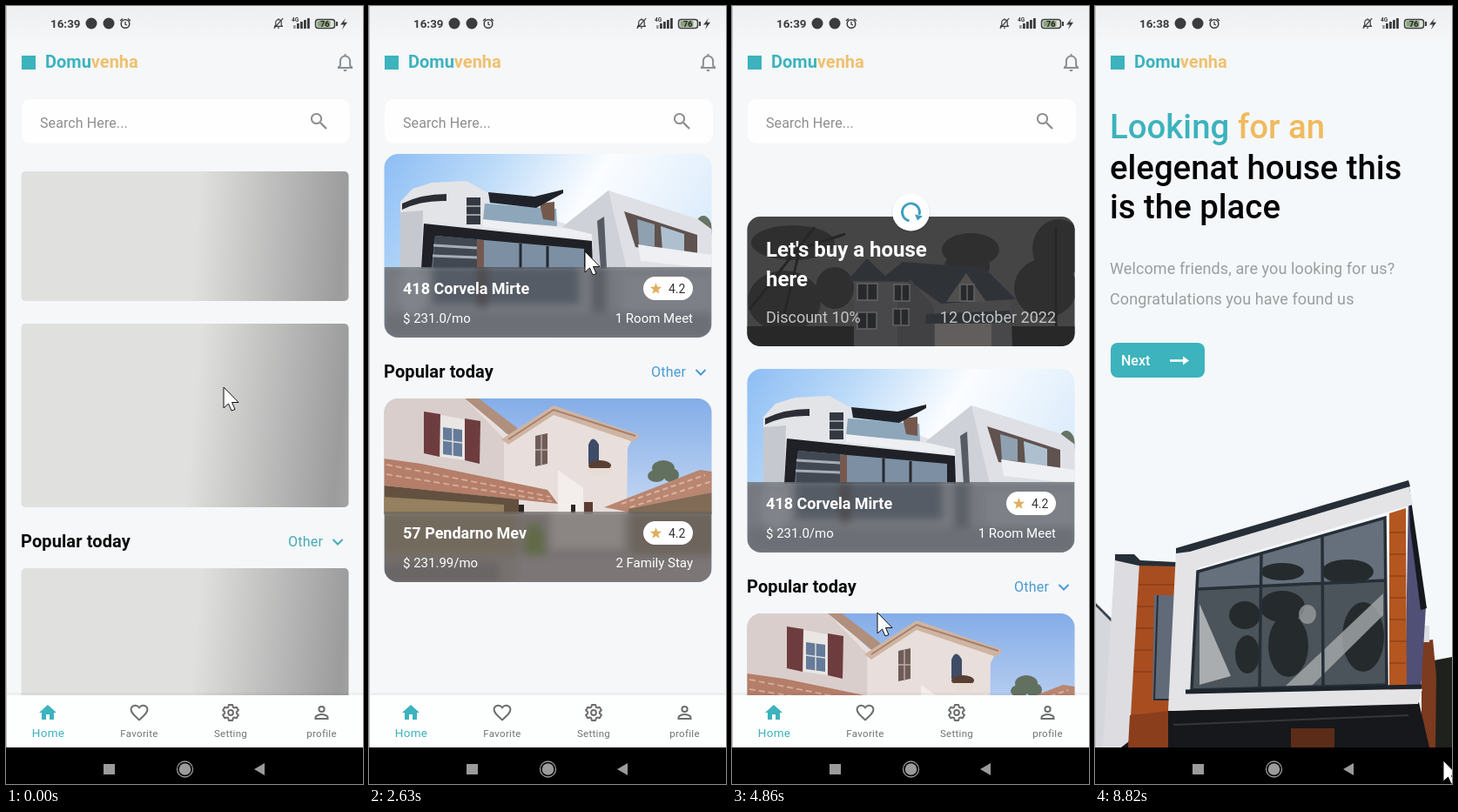
Recreate the animation shown at these times as an HTML page. Size 410 px wide and 894 px high, loop 9.02 s.

```html
<!DOCTYPE html>
<html lang="en">
<head>
<meta charset="utf-8">
<title>House rental app</title>
<style>
html, body { margin: 0; width: 100%; height: 100%; overflow: hidden; background: #f5f7f9 }
svg { display: block; width: 100vw; height: 100vh }
text { font-family: Roboto, sans-serif; white-space: pre }
</style>
</head>
<body>
<svg id="stage" viewBox="0 0 410 894"></svg>
<script>
const TEAL = '#3cb3bd', GOLD = '#efc071', LOOP = 9020;
const $ = id => document.getElementById(id);

// Drawing helpers: each returns SVG markup.
const poly = (d, fill, extra = '') => `<path d="M${d}Z" fill="${fill}" ${extra}/>`;
const line = (d, color, w = 2, extra = '') => `<path d="M${d}" fill="none" stroke="${color}" stroke-width="${w}" ${extra}/>`;
const rect = (x, y, w, h, fill, extra = '') => `<rect x="${x}" y="${y}" width="${w}" height="${h}" fill="${fill}" ${extra}/>`;
const oval = (x, y, rx, ry, fill, extra = '') => `<ellipse cx="${x}" cy="${y}" rx="${rx}" ry="${ry}" fill="${fill}" ${extra}/>`;
const text = (x, y, s, size, fill, weight = 400, extra = '') =>
  `<text x="${x}" y="${y}" font-size="${size}" fill="${fill}" font-weight="${weight}" ${extra}>${s}</text>`;
const move = (x, y, body, extra = '') => `<g transform="translate(${x} ${y})" ${extra}>${body}</g>`;
const END = 'text-anchor="end"', SOFT = 'filter="url(#soft)"';

const gear = Array.from({ length: 24 }, (_, i) => {
  const a = (Math.floor(i / 4) * 60 + [-24, -13, 13, 24][i % 4] + 30) * Math.PI / 180;
  const r = i % 4 % 3 ? 9.3 : 6.8;
  return (12 + r * Math.cos(a)).toFixed(1) + ' ' + (12 + r * Math.sin(a)).toFixed(1);
}).join(' ');
const star = Array.from({ length: 10 }, (_, i) => {
  const a = i * Math.PI / 5, r = i % 2 ? 2.9 : 7;
  return (r * Math.sin(a)).toFixed(1) + ' ' + (-r * Math.cos(a)).toFixed(1);
}).join(' ');
const bell = c => line('12 4.5a5.6 5.6 0 0 0-5.6 5.6V15.5l-2 2v.5H19.6v-.5l-2-2V10.1A5.6 5.6 0 0 0 12 4.5ZM12 2v3', c)
  + poly('10 20H14Q14 22.3 12 22.3T10 20', c);

// Status bar
const ink = '#3a3c3e';
const status = text(51, 25, '16:39', 13.4, ink, 700, 'id="clock"')
  + oval(98, 20, 6.5, 6.5, ink) + oval(118, 20, 6.5, 6.5, ink)
  + `<circle cx="137" cy="20.5" r="4.8" fill="none" stroke="${ink}" stroke-width="1.5"/>`
  + line('137 18V21L139 22M131 17L134 14.5M143 17L140 14.5', ink, 1.3)
  + move(306, 13, `<g transform="scale(.58)">${bell(ink)}${line('3 22L21 2', ink, 2)}</g>`)
  + text(328, 18, '4G', 6.5, ink, 700)
  + [0, 1, 2, 3, 4].map(i => rect(330 + i * 4, 22 - i * 2, 2.8, 4 + i * 2, i ? ink : '#999')).join('')
  + rect(355.5, 15.5, 22, 10, '#dfe6da', `rx="3" stroke="${ink}" stroke-width="1.5"`)
  + rect(357.5, 17.3, 15, 6.4, '#8aa07b', 'rx="1"') + rect(379, 18, 2, 5, ink)
  + text(361, 23.7, '76', 9, '#222', 700)
  + poly('390 14 384 21.5 388 21.5 386 27 392 18.8 388 18.8', ink);

const header = rect(18, 57, 16, 16, TEAL) + text(45, 71, `Domu<tspan fill="${GOLD}">venha</tspan>`, 20, TEAL, 700);

// Scrolling content is laid out 48px lower than its resting place.
const bannerArt = rect(17, 238, 377, 149, '#505152')
  + [[70, 268, 48, 20], [60, 335, 42, 35], [274, 276, 33, 19], [270, 295, 26, 18], [375, 275, 30, 34], [360, 320, 36, 34], [118, 320, 22, 24]]
    .map(a => oval(...a, '#343536')).join('')
  + line('20 345L95 250M60 350L78 275 130 258M372 380V250', '#29292a', 3)
  + rect(17, 364, 377, 23, '#2b2c2b')
  + poly('140 310 205 312 320 328 322 387 140 387', '#555457')
  + poly('132 312 155 286 176 306 196 290 290 297 326 333 240 338 205 313', '#353940')
  + poly('190 387 190 330 205 310 232 342 232 387', '#4c4b4e')
  + poly('246 336 269 303 292 336', '#605e5c') + poly('223 350 318 346 326 360 222 361', '#353940')
  + rect(233, 361, 65, 26, '#74716f')
  + [[144, 315, 23], [186, 316, 18], [144, 348, 22], [185, 344, 18], [262, 316, 16]]
    .map(([x, y, w]) => rect(x, y, w, 19, '#2b2d31', 'stroke="#777" stroke-width="1.5"') + line(`${x + w / 2} ${y}v19`, '#777', 1.5)).join('')
  + rect(17, 238, 377, 149, '#1c1c1e', 'opacity=".22"');
const banner = `<g clip-path="url(#c0)">${bannerArt}</g>`
  + text(39, 284, "Let's buy a house", 24, '#fff', 700) + text(39, 318, 'here', 24, '#fff', 700)
  + text(39, 360, 'Discount 10%', 18, '#c4c4c4') + text(372, 360, '12 October 2022', 18, '#c4c4c4', 400, END);

const modernArt = rect(17, 413, 377, 211, 'url(#sky1)')
  + oval(384, 500, 10, 16, '#667365')
  + poly('36 545 36 468 50 453 72 446 112 444 137 458 139 482 217 490 256 505 258 545', '#e3e4e8')
  + poly('36 480 62 478 60 545 36 545', '#c6c8cf')
  + poly('38 470Q60 459 89 459V467Q60 466 38 477', '#2b2e34')
  + rect(112, 463, 16, 31, '#343941') + line('112 473H128M112 483H128', '#b5bac2', 1.5)
  + poly('133 470 215 476 216 496 131 489', '#8da6ba') + poly('196 470 213 468 213 490 200 488', '#74584c')
  + poly('137 457 190 462 223 454 223 458 192 475 139 469', '#20222a')
  + poly('131 488 258 502 258 513 131 497', '#eeeff2')
  + poly('63 493 256 513 257 545 60 545', '#1f2127')
  + poly('76 507 247 522 247 545 72 545', '#7c8fa3')
  + poly('76 507 124 511 124 545 73 545', '#424851') + line('74 518L124 521M73 530L124 532', '#a7adb5', 3)
  + rect(124, 512, 8, 33, '#76594e') + line('174 516V545M205 519V545', '#24272d', 3)
  + poly('222 497 275 455 378 488 394 500 394 545 258 545 256 505', '#dfe0e5')
  + poly('222 497 275 455 296 545 258 545 256 505', '#cfd1d8')
  + poly('293 479 377 506 377 530 306 520', '#5f524f')
  + poly('308 488 328 494 328 519 310 518', '#8fa0b0') + poly('335 496 362 505 362 527 337 524', '#aec0d0')
  + poly('309 517 394 529 394 545 312 536', '#eef0f3')
  + poly('262 490 270 485 273 545 266 545', '#575b63');
const modernHaze = rect(10, 540, 390, 90, '#85888e') + rect(72, 540, 170, 46, '#575f69')
  + rect(124, 540, 12, 50, '#4c4442') + rect(255, 540, 18, 75, '#5f636a') + rect(290, 552, 104, 42, '#8f9298')
  + rect(17, 595, 377, 30, '#777a80') + oval(50, 570, 18, 30, '#93969c');

const villaArt = rect(17, 537, 377, 211, 'url(#sky2)')
  + [[338, 617, 13, 9], [330, 626, 10, 7], [347, 625, 9, 8]].map(a => oval(...a, '#62705f')).join('')
  + poly('17 537 115 537 158 578 212 552 303 582 297 594 296 670 17 670', '#e8dfdc')
  + poly('17 537 110 537 155 583 155 634 17 607', '#d9cecb')
  + poly('110 537 126 537 173 573 163 581', '#b08f7d')
  + poly('152 584 212 545 311 579 304 587 212 556 160 590', '#ceb5a2')
  + line('160 584L212 550 306 580', '#a97f6c', 2)
  + poly('217 619 246 640 246 670 217 670', '#f3eeec')
  + poly('63 552 82 555 81 604 63 600', '#6d3c3f') + poly('110 560 128 563 127 612 110 608', '#6d3c3f')
  + poly('82 556 110 561 110 608 82 604', '#e9e6e4') + poly('85 570 107 573 107 604 85 601', '#657b99')
  + line('96 570V603M85 585L107 588', '#ddd', 1.5)
  + poly('191 580 205 577 205 612 191 615', '#6f5c58') + line('198 579V613M191 596H205', '#b7aaa5', 1.5)
  + poly('252 612V590Q257 577 264 590V612', '#3e4c68') + oval(265, 614, 13, 6, '#593f33')
  + poly('250 617 280 617 272 626 256 626', '#e6dcd4')
  + poly('17 606 60 612 205 642 217 658 17 637', '#b47e69')
  + line('20 613L208 650M20 624L210 655', '#d5a997', 2, 'stroke-dasharray="7 4"')
  + poly('17 637 172 653 172 670 17 670', '#64503f') + poly('17 650 155 659 155 670 17 670', '#95805f')
  + poly('270 662 380 619 394 621 394 645 300 668', '#b88671')
  + line('290 658L386 625M300 662L394 632', '#dab3a0', 2, 'stroke-dasharray="6 4"')
  + poly('298 664 394 645 394 670 298 670', '#7f6b56')
  + rect(172, 659, 6, 10, '#2b2524') + rect(232, 659, 5, 10, '#2b2524') + rect(247, 656, 10, 14, '#5b3c32');
const villaHaze = rect(10, 665, 390, 90, '#857c76') + rect(10, 665, 160, 52, '#81735f')
  + rect(208, 665, 85, 45, '#a39993') + rect(300, 665, 100, 55, '#776a5d') + oval(190, 703, 13, 24, '#69733f')
  + rect(170, 718, 230, 35, '#8d8480') + rect(10, 725, 140, 25, '#746d6a');

const card = (y, clip, art, haze, name, price, note) =>
  `<g clip-path="url(#${clip})">${art}<g clip-path="url(#${clip}b)"><g ${SOFT}>${haze}</g>`
  + rect(17, y + 130, 377, 81, '#55585e', 'opacity=".3"') + '</g></g>'
  + text(39, y + 161, name, 18, '#fff', 700) + text(39, y + 194, price, 15, '#fff')
  + text(372, y + 194, note, 15, '#fff', 400, END)
  + rect(315, y + 141, 57, 27, '#fff', 'rx="13.5"')
  + move(329.5, y + 155, poly(star, '#dfae60')) + text(344, y + 160, '4.2', 14, '#333');

const cards = banner
  + card(413, 'c1', modernArt, modernHaze, '418 Corvela Mirte', '$ 231.0/mo', '1 Room Meet')
  + move(0, 157, card(537, 'c2', villaArt, villaHaze, '57 Pendarno Mev', '$ 231.99/mo', '2 Family Stay'));

const boxes = [[238, 149], [413, 211], [694, 211]];
const W = 376;
const bones = boxes.map(([y, h], i) => rect(17.5, y, W, h, `url(#g${i})`, 'rx="5"')).join('');

const tab = (x, label, icon) => move(x - 12, 800, icon)
  + text(x, 840, label, 11.5, '#737373', 400, 'text-anchor="middle" letter-spacing=".3"');
const GRAY = '#6d6d6d';
const tabs = rect(0, 789, 410, 3, '#000', 'opacity=".03"') + rect(0, 792, 410, 60, '#fdfefe')
  + move(36, 800, poly('10 20v-6h4v6h5v-8h3L12 3 2 12h3v8', TEAL))
  + text(48.5, 840, 'Home', 13.5, TEAL, 400, 'text-anchor="middle" letter-spacing=".3"')
  + tab(153, 'Favorite', line('12 20.3C6 15 2.6 12.3 2.6 8.5 2.6 3.5 9 2 12 6.3 15 2 21.4 3.5 21.4 8.5 21.4 12.3 18 15 12 20.3Z', GRAY))
  + tab(258, 'Setting', line(gear + 'Z', GRAY, 2, 'stroke-linejoin="round"') + `<circle cx="12" cy="12" r="2.9" fill="none" stroke="${GRAY}" stroke-width="2"/>`)
  + tab(362.5, 'profile', `<circle cx="12" cy="8" r="3.1" fill="none" stroke="${GRAY}" stroke-width="2"/>`
    + line('5 19v-1.4c0-2.3 4.8-3.5 7-3.5s7 1.2 7 3.5V19Z', GRAY));

const home = rect(18, 107, 377, 51, '#fefefe', 'rx="10"')
  + text(39, 140, 'Search Here...', 16, '#8e8e8e', 400, 'letter-spacing=".1"')
  + `<circle cx="356.5" cy="129.5" r="5.6" fill="none" stroke="#8e8e8e" stroke-width="2"/>` + line('361 134L368 141', '#8e8e8e', 2.4)
  + move(377.5, 53, bell('#8a8f93'))
  + `<g clip-path="url(#view)"><g id="scroll"><g id="bones">${bones}</g><g id="cards">${cards}</g>`
  + text(17, 670, 'Popular today', 20, '#0a0a0a', 700, 'letter-spacing=".1"')
  + `<g id="other">${text(324, 669, 'Other', 16, 'currentColor', 400, 'letter-spacing=".25"')}${line('375.5 661L381 666.5 386.5 661', 'currentColor')}</g></g>`
  + `<g id="puller">${oval(0, 1, 22.5, 22.5, '#000', 'opacity=".08"')}${oval(0, 0, 21.5, 21.5, '#fff')}<g id="arc">`
  + line('-2 9.8A10 10 0 1 1 9.5 3', '#3f9dc0', 2.8) + poly('4.5 2.5 13.5 4.5 7.5 9.5', '#3f9dc0') + '</g></g></g>' + tabs;

// Welcome page
const wood = '#a84d20', dark = '#262e37';
const house = poly('0 690 19 708 10 852 0 852', '#d5d7dc') + line('0 687L20 707', '#3a444f', 3)
  + poly('389 752 410 748 410 852 376 852', '#1f211d') + poly('375 730 388 728 392 770 391 852 375 852', '#7c3a1e') + rect(374, 712, 10, 19, '#dcdde0')
  + poly('50 642 94 642 86 852 38 852', wood) + poly('68 677 91 677 85 797 66 797', '#606a79') + line('72 677L68 797H88', dark, 2)
  + line('47 665H92M46 690H68M44 715H67M43 740H66M42 765H66M41 815H84', '#7e3513', 1)
  + poly('23 634 51 640 39 852 9 852', '#dddde1') + poly('23 630 45 630 52 637 93 639 93 644 50 643 23 637', dark)
  + poly('30 852 84 810 372 800 384 852', '#17181b') + poly('38 852 40 815 84 810 84 852', '#8a3e1b')
  + line('90 826L360 815', '#33363b', 2) + rect(225, 830, 50, 22, '#5b2d19')
  + poly('360 560 380 690 374 790 356 790', '#504f76') + poly('360 547 381 692 374 694 362 600', '#15191d')
  + poly('338 583 357 577 358 790 338 790', '#b4561f')
  + line('338 605H357M338 630H357M338 655H357M338 680H357M338 705H357M338 730H357M338 755H357', '#83390f', 1)
  + poly('93 627 360 550 365 573 118 646 109 788 376 785 371 802 84 810', '#e4e4e7')
  + poly('93 623 360 545 362 552 109 627 93 629', dark)
  + poly('118 650 333 588 335 780 110 786', '#4b535b') + poly('118 650 333 588 333 660 118 670', '#66707c')
  + '<g clip-path="url(#glass)">'
  + [[215, 690, 26, 18], [222, 735, 23, 36], [290, 650, 30, 14], [308, 725, 24, 40], [172, 700, 18, 16], [175, 745, 14, 22], [215, 650, 25, 10]]
    .map(a => oval(...a, '#252b2d')).join('')
  + poly('120 687 156 770 120 780', '#a9adb0') + poly('218 782 331 675 331 700 248 782', '#a7abad', 'opacity=".8"')
  + oval(244, 699, 10, 11, '#a3a7a6', 'opacity=".7"') + '</g>'
  + line('118 650L333 588 335 780 111 786ZM118 670L334 660M191 630L189 783M261 610L262 782', dark, 3.5)
  + line('104 788L375 782', '#1e242b', 5);
const welcome = rect(1, 42, 409, 810, '#f5f8fa')
  + text(17, 152, `Looking <tspan fill="#f0ba5f">for an</tspan>`, 38.3, TEAL, 500)
  + text(17, 199, 'elegenat house this', 38.3, '#050505', 500) + text(17, 244, 'is the place', 38.3, '#050505', 500)
  + text(17, 308, 'Welcome friends, are you looking for us?', 18, '#9b9d9f', 400, 'letter-spacing=".1"')
  + text(17, 343, 'Congratulations you have found us', 18, '#9b9d9f', 400, 'letter-spacing=".1"')
  + rect(18, 387, 108, 40, TEAL, 'rx="8"') + text(30, 413, 'Next', 16, '#fff', 500)
  + line('86 407.5H103', '#fff', 2.6) + poly('101 402.5 108 407.5 101 412.5', '#fff') + house;

const softKeys = rect(0, 852, 410, 42, '#000') + rect(112, 871, 13, 12, '#9b9b9b')
  + oval(205.5, 877, 6.8, 6.8, '#9b9b9b') + `<circle cx="205.5" cy="877" r="9" fill="none" stroke="#9b9b9b" stroke-width="1.3"/>`
  + poly('297 870 297 884 285 877', '#9b9b9b');

const stops = list => list.map(([o, c]) => `<stop offset="${o}" stop-color="${c}"/>`).join('');
const clipBox = (id, y, h, r, x = 17.5, w = W) => `<clipPath id="${id}">${rect(x, y, w, h, '#000', `rx="${r}"`)}</clipPath>`;
const defs = boxes.map(([y, h], i) =>
    `<linearGradient id="g${i}" gradientUnits="userSpaceOnUse" x1="${17.5 - W}" x2="${17.5 + 2 * W}" y1="${y}" y2="${y + h / 2}">`
    + stops([[.35, '#e0e0df'], [.5, '#9c9c9c'], [.65, '#e0e0df']]) + '</linearGradient>').join('')
  + `<linearGradient id="sky1" x2="1" y2=".35">${stops([[0, '#8dbdf4'], [.3, '#b9d9f8'], [.62, '#fbfdff'], [1, '#dcecfb']])}</linearGradient>`
  + `<linearGradient id="sky2" x2="0" y2="1">${stops([[0, '#84ade8'], [.6, '#c3d6f2']])}</linearGradient>`
  + `<linearGradient id="top" x2="0" y2="1">${stops([[0, '#edeff1'], [1, '#f5f7f9']])}</linearGradient>`
  + clipBox('c0', 238, 149, 15) + clipBox('c1', 413, 211, 16) + clipBox('c2', 537, 211, 16)
  + clipBox('c1b', 543, 81, 0) + clipBox('c2b', 667, 81, 0) + clipBox('view', 168.5, 623.5, 0, 0, 410)
  + '<clipPath id="glass"><path d="M118 650 333 588 335 780 111 786Z"/></clipPath>'
  + '<filter id="soft"><feGaussianBlur stdDeviation="5"/></filter>';

$('stage').innerHTML = `<defs>${defs}</defs>` + rect(0, 0, 410, 894, '#f5f7f9') + rect(0, 0, 410, 45, 'url(#top)')
  + `<g id="home">${home}</g><g id="welcome">${welcome}</g>` + status + header + rect(0, 0, 1, 852, '#bfc1c3') + softKeys
  + `<path id="cursor" d="M0 0V24L5.5 19 9 27 13 25.5 9.5 17.5H17Z" fill="#fff" stroke="#111" stroke-width="1"/>`;

// Motion: rows of [time, values...], eased between rows.
const offsets = [[0, 0], [1800, 0], [2030, -109], [2630, -195], [2720, -197], [3050, -110], [3150, -110],
  [3700, 48], [3760, 48], [4100, 0], [4300, 0], [4860, 52], [4920, 52], [5150, 0], [LOOP, 0]];
const pointer = [[0, 250, 438], [1100, 250, 438], [1600, 248, 540], [1800, 248, 540], [2030, 248, 431], [2630, 248, 282],
  [2750, 248, 280], [3150, 168, 430], [3700, 168, 641], [3800, 168, 641], [4300, 168, 592], [4860, 167, 697],
  [4950, 167, 697], [6100, 373, 864], [6600, 373, 864], [7300, 400, 867], [LOOP, 400, 867]];
const clamp = v => Math.max(0, Math.min(1, v));
const ramp = (t, from, span) => clamp((t - from) / span);
function sample(rows, t) {
  const i = Math.max(1, rows.findIndex(r => r[0] > t));
  const a = rows[i - 1], b = rows[i], u = ramp(t, a[0], b[0] - a[0]), k = u * u * (3 - 2 * u);
  return a.slice(1).map((v, j) => v + (b[j + 1] - v) * k);
}
const place = (id, value) => $(id).setAttribute('transform', value);
const RELEASE = 4930, RELOADED = 6930;

function draw(t) {
  const [off] = sample(offsets, t), [cx, cy] = sample(pointer, t);
  place('scroll', `translate(0 ${off - 48})`);
  place('cursor', `translate(${cx} ${cy})`);

  const loaded = t < RELEASE ? ramp(t, 980, 220) : ramp(t, RELOADED, 220);
  $('cards').style.opacity = loaded;
  $('bones').style.opacity = loaded < 1 ? 1 : 0;
  $('other').style.color = loaded > .5 ? '#4a9ad2' : '#45aab8';
  const phase = (t < RELEASE ? .745 + t / 1500 : (t - 4835) / 1500) % 1;
  boxes.forEach((_, i) => $('g' + i).setAttribute('gradientTransform', `translate(${(phase * 2 - 1) * W} 0)`));

  const pulled = t > 4300 && t < 5250;
  const y = t < RELEASE ? 146 + off * 1.75 : 237 - 9 * ramp(t, RELEASE, 120);
  $('puller').style.display = pulled ? '' : 'none';
  place('puller', `translate(205.5 ${y}) scale(${1 - ramp(t, 5030, 220)})`);
  place('arc', `rotate(${t < RELEASE ? (off - 52) * 4 : (t - RELEASE) * .5})`);

  const fade = ramp(t, 7770, 480);
  $('welcome').style.opacity = fade;
  $('clock').textContent = fade > .5 ? '16:38' : '16:39';
}

const start = performance.now();
(function tick() {
  draw((performance.now() - start) % LOOP);
  requestAnimationFrame(tick);
})();
</script>
</body>
</html>
```
